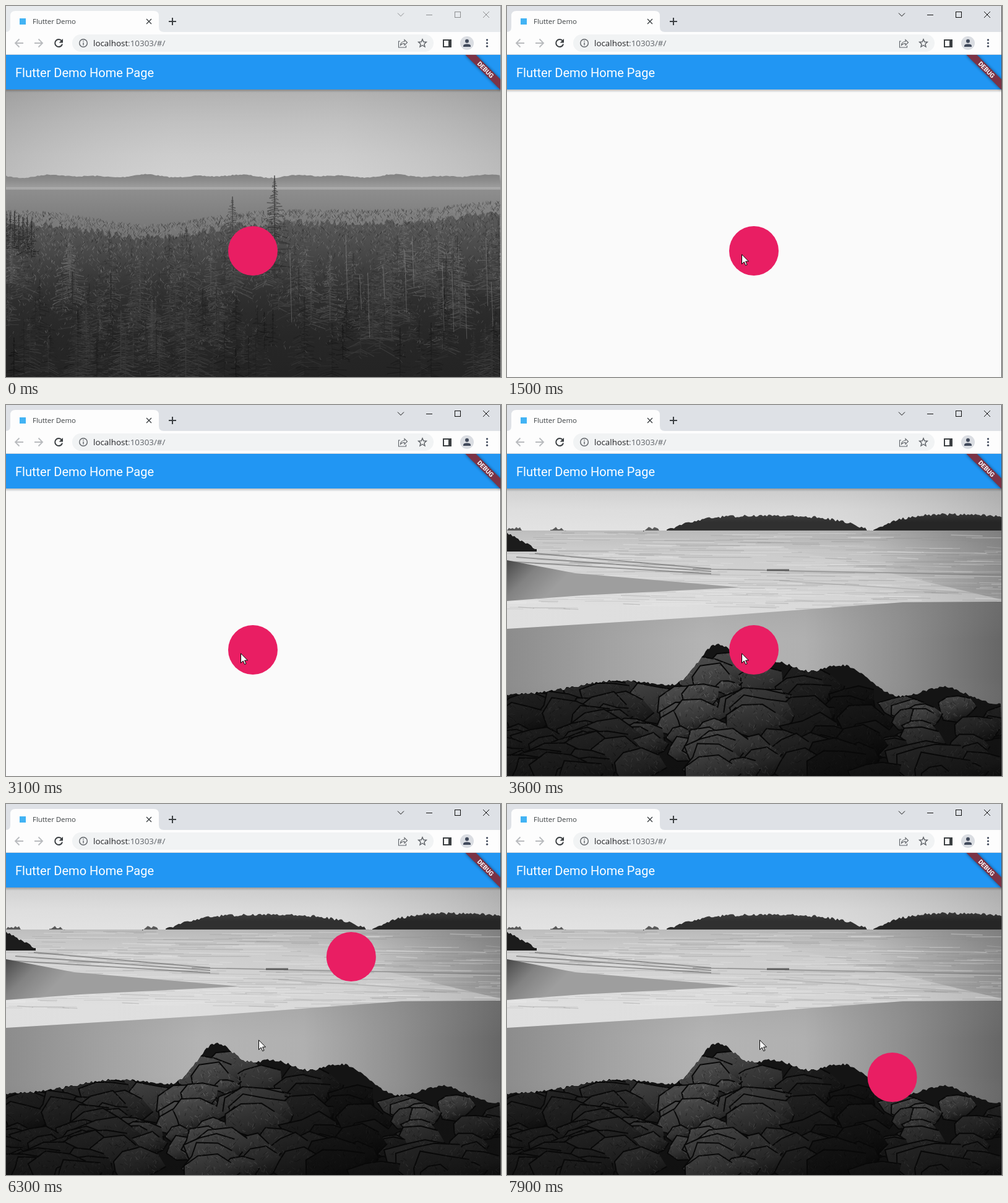
An HTML page with a canvas for the animation above (8000 ms loop, 800 px wide and 600 px high).

```html
<!DOCTYPE html>
<html lang="en">
<head>
<meta charset="utf-8">
<title>Flutter Demo</title>
<style>
  html, body { margin: 0; width: 100%; height: 100%; overflow: hidden; background: #fafafa; }
  canvas, svg { position: absolute; left: 0; top: 0; width: 800px; height: 600px; }
  .ui { font-family: "Open Sans", "Noto Sans", sans-serif; }
  .app { font-family: Roboto, sans-serif; fill: #fff; }
  .line { fill: none; stroke: #5f6368; stroke-width: 1.4; }
  .dark { stroke: #3c4043; }
  .bold { stroke-width: 2; }
</style>
</head>
<body>
<canvas id="forest" width="800" height="600"></canvas>
<canvas id="mist" width="800" height="600"></canvas>
<canvas id="coast" width="800" height="600"></canvas>
<svg viewBox="0 0 800 600">
  <defs>
    <filter id="soft" x="-50%" y="-100%" width="200%" height="300%"><feGaussianBlur stdDeviation="2.6"/></filter>
    <linearGradient id="drop" x1="0" y1="0" x2="0" y2="1">
      <stop offset="0" stop-opacity=".24"/><stop offset="1" stop-opacity="0"/>
    </linearGradient>
    <clipPath id="page"><path d="M0 79H799V600H0Z"/></clipPath>
  </defs>

  <circle id="ball" r="40" fill="#e91e63"/>

  <!-- app bar -->
  <path fill="url(#drop)" d="M0 135H799V140H0Z"/>
  <path fill="#2196f3" d="M0 79H799V135H0Z"/>
  <text class="app" x="15" y="115" font-size="20">Flutter Demo Home Page</text>
  <g clip-path="url(#page)">
    <g transform="translate(799 79) rotate(45)">
      <path d="M-40 28H40V40H-40Z" opacity=".5" filter="url(#soft)"/>
      <path d="M-40 28H40V40H-40Z" fill="#7b3346"/>
      <text class="app" y="37.6" font-size="10.2" font-weight="700" text-anchor="middle">DEBUG</text>
    </g>
  </g>

  <!-- tab strip -->
  <path id="strip" d="M0 0H800V42H0Z"/>
  <path fill="#fdfdfd" d="M0 42Q7 42 7 34V16Q7 8 15 8H239Q247 8 247 16V34Q247 42 255 42H800V78H0Z"/>
  <path fill="#d5d7da" d="M0 78H800V79H0Z"/>
  <rect x="22" y="20" width="10" height="10" fill="#42b3f4"/>
  <text class="ui" x="43" y="29" font-size="11.4" fill="#3c4043">Flutter Demo</text>
  <path class="line dark" d="M227 21L235 29M235 21L227 29"/>
  <path class="line dark bold" d="M263 25H275M269 19V31"/>
  <g id="controls" fill="none">
    <path d="M633 11.5L638 16.5L643 11.5M771 9L781 19M781 9L771 19"/>
    <path shape-rendering="crispEdges" d="M679 14.5H689M725.5 9.5H734.5V18.5H725.5Z"/>
  </g>

  <!-- toolbar -->
  <g fill="none" stroke="#b9bbbe" stroke-width="1.8">
    <path d="M28 60H15M21.5 53.5L15 60L21.5 66.5"/>
    <path d="M46 60H59M52.5 53.5L59 60L52.5 66.5"/>
  </g>
  <path class="line dark bold" d="M90 56.5A6 6 0 1 0 91 61.5"/>
  <path fill="#3c4043" d="M92 53V59.5H85.5Z"/>
  <rect x="107" y="46" width="584" height="28" rx="14" fill="#f1f3f4"/>
  <circle class="line" cx="125" cy="60" r="6.3"/>
  <path class="line" d="M125 59V63.5M125 56V57.6"/>
  <text class="ui" x="141" y="65" font-size="13.4" fill="#202124">localhost<tspan fill="#5f6368">:10303/#/</tspan></text>
  <path class="line" style="stroke-width:1.1" d="M637 57H634.5V67H646.5V64M637.5 63.5Q638 57.5 644 57.5V54.5L648.5 59L644 63.5V60.5Q640 60.5 637.5 63.5Z"/>
  <path class="line" d="M673 53.8L674.8 58L679.4 58.4L675.9 61.4L677 66L673 63.5L669 66L670.1 61.4L666.6 58.4L671.2 58Z"/>
  <path fill="#3c4043" d="M706 54H720V67H706ZM708 56V65H715V56Z" fill-rule="evenodd"/>
  <circle cx="745" cy="60" r="11" fill="#dadde2"/>
  <g fill="#414a5b">
    <circle cx="745" cy="56.8" r="3"/><path d="M739 66V64.5Q739 61.5 745 61.5T751 64.5V66Z"/>
    <circle cx="777.5" cy="54.8" r="1.6"/><circle cx="777.5" cy="60" r="1.6"/><circle cx="777.5" cy="65.2" r="1.6"/>
  </g>
  <path id="edge" d="M799 0H800V600H799Z"/>

  <path id="cursor" fill="#fff" stroke="#000" d="M.5 .8V16.3L4.2 12.8L6.7 18.5L9 17.5L6.6 12H11.5Z"/>
</svg>

<script>
const $ = id => document.getElementById(id);
const gray = (l, a = 1) => `rgba(${l},${l},${l},${a})`;
const bell = (x, mid, width) => Math.exp(-(((x - mid) / width) ** 2));
let seed = 7;
const rnd = (a = 0, b = 1) => {
  seed = (seed * 16807) % 2147483647;
  return a + (b - a) * seed / 2147483647;
};
const times = (n, f) => { for (let i = 0; i < n; i++) f(i / n); };

// ---- pictures ----
function painter(id) {
  const c = $(id).getContext('2d');
  c.beginPath(); c.rect(0, 135, 799, 465); c.clip();
  const fade = (x0, y0, x1, y1, tones) => {
    const g = c.createLinearGradient(x0, y0, x1, y1);
    tones.forEach((l, i) => g.addColorStop(i / (tones.length - 1), gray(...[l].flat())));
    return g;
  };
  const trace = pts => { c.beginPath(); pts.forEach(p => c.lineTo(...p)); };
  const poly = (pts, fill) => { trace(pts); c.fillStyle = fill; c.fill(); };
  const line = (x0, y0, x1, y1, l, w = 1, a = 1) => {
    trace([[x0, y0], [x1, y1]]);
    c.strokeStyle = gray(l, a); c.lineWidth = w; c.stroke();
  };
  const box = (y0, y1, fill) => poly([[0, y0], [800, y0], [800, y1], [0, y1]], fill);
  const band = (y0, y1, ...tones) => box(y0, y1, fade(0, y0, 0, y1, tones));
  return { c, fade, trace, poly, line, box, band };
}

// Area below y = top(x), with a bumpy upper edge
function below(top, base, bump, x0 = 0, x1 = 800) {
  const pts = [[x0, base]];
  for (let x = x0; x <= x1; x += 3) pts.push([x, top(x) + rnd(-bump, bump)]);
  return [...pts, [x1, base]];
}

function paintForest() {
  const { fade, poly, line, box, band } = painter('forest');
  band(135, 295, 172, 190, 203, 210);
  box(135, 295, fade(0, 0, 800, 0, [[110, .2], [220, .1], [220, .12], [110, .2]]));
  poly(below(x => 275 + 3 * Math.sin(x / 16) * Math.sin(x / 61 + 1), 294, .8), fade(0, 270, 0, 294, [128, 140, 158]));
  band(293, 297, 172, 165);
  band(297, 400, 142, 124, 108);

  const top = x => 350 + 24 * bell(x, 230, 120) - 14 * bell(x, 800, 90);
  const conifer = (x, y, h, l, spread = .25) => {
    line(x, y, x, y + h, l, 1.2);
    for (let d = 3; d < h; d += 3) for (const side of [-1, 1]) {
      const w = Math.min(26, d * spread) * rnd(.3, 1.4);
      line(x, y + d, x + side * w, y + d + w * rnd(-.1, .6), l + rnd(-12, 24), 1.3, .75);
    }
  };
  poly(below(top, 600, 6), fade(0, 340, 0, 600, [90, 70, 50, 42, 38]));
  times(7, p => conifer(p * 48, 329 + p * 18 + rnd(-3, 4), 60, 44));
  times(170, p => {
    const x = rnd(0, 800);
    conifer(x, top(x) - 14 + p * 200 + rnd(0, 14), rnd(50, 120), 86 - p * 42 + rnd(-28, 14));
  });
  conifer(366, 308, 150, 66);
  conifer(434, 274, 170, 52, .2);
  // twigs, thinning out downwards, and bare trunks
  times(7000, () => {
    const x = rnd(0, 800), d = 250 * rnd() * rnd();
    line(x, top(x) + d - 22, x + rnd(-4, 4), top(x) + d - 18, rnd(24, 155), 1, .5);
  });
  times(12, () => {
    const x = rnd(440, 790), y = rnd(360, 450);
    line(x, y, x + 3, y + rnd(50, 120), 140, 1, .6);
  });
  band(400, 600, [30, 0], [30, .22], [30, .3]);
}

function paintMist() {
  painter('mist').band(135, 600, 205, 185, 140, 90, 60);
}

function paintCoast() {
  const { c, fade, trace, poly, line, box, band } = painter('coast');
  band(135, 203, 205, 220, 226);
  band(203, 365, 182, 206, 212, 222, 222);
  box(135, 365, fade(0, 0, 800, 0, [[235, .15], [225, .1], [170, .1], [100, .32]]));
  poly([[330, 203], [800, 203], [800, 315]], fade(400, 320, 800, 210, [[90, 0], [90, .05], [90, .45]]));
  times(420, () => {
    const x = rnd(-80, 800), y = rnd(206, 330);
    line(x, y, x + rnd(20, 130), y + rnd(-.5, 2), rnd() < .5 ? 135 : 240, rnd(.6, 1.6), .3);
  });

  const island = (x0, x1, h, l) => poly(
    below(x => 203 - h * (1 - Math.abs(2 * (x - x0) / (x1 - x0) - 1) ** 3), 203, 2.2, x0, x1),
    fade(0, 175, 0, 204, [l + 18, l, l]));
  island(258, 586, 24, 48);
  island(592, 860, 26, 38);
  for (const x of [0, 70, 220]) island(x, x + 26, 4, 90);
  poly(below(x => 207 + x * .55, 237, 2, 0, 48), gray(28));

  // wave fronts and wet sand
  times(3, p => line(45 - p * 90, 240 + p * 18, 330, 265 + p * 12, 105, 2, .6));
  line(300, 265, 800, 275, 120, 1.6, .7);
  line(420, 267, 456, 267, 75, 3, .8);
  line(440, 284, 800, 307, 160, 1.4, .6);
  poly([[0, 251], [110, 272], [378, 295], [120, 308], [0, 317]], fade(0, 250, 60, 312, [70, 130, 158]));
  const sand = [[0, 362], [330, 342], [640, 319], [800, 318], [800, 600], [0, 600]];
  poly(sand, fade(0, 0, 800, 0, [140, 162, 180, 176, 142, 102]));
  poly(sand, fade(0, 320, 0, 500, [[130, .2], [150, 0], [150, 0], [100, .25]]));

  const ridge = x => 470 + x * .02 - 28 * bell(x, 190, 110) - 78 * bell(x, 338, 44)
    - 62 * bell(x, 430, 62) - 58 * bell(x, 545, 60) - 28 * bell(x, 705, 55);
  const light = (x, p) => 34 + 46 * bell(x, 320, 130) + 62 * bell(x, 690, 60) * (1 - p) - 16 * bell(x, 540, 70);
  const rock = (x, y, r, l) => {
    const pts = [];
    times(9, p => {
      const a = p * 2 * Math.PI, d = r * rnd(.7, 1.15);
      pts.push([x + d * 1.3 * Math.cos(a), y + d * .85 * Math.sin(a)]);
    });
    c.save();
    poly(pts, fade(x - r * .3, y - r, x + r * .4, y + r, [l, l * .75, l * .2]));
    c.strokeStyle = gray(8); c.lineWidth = 2; c.stroke();
    c.clip();
    times(r * 5, () => {
      const u = x + rnd(-r, r) * 1.3, v = y + rnd(-r, r);
      line(u, v, u + rnd(-6, 6), v + rnd(1, 6), rnd(0, l * 1.9), 1, .45);
    });
    c.restore();
  };
  const cliff = below(ridge, 600, 2);
  poly(cliff, gray(20));
  trace(cliff); c.clip();
  times(130, p => {
    const x = rnd(0, 800), y = ridge(x);
    rock(x, y + 14 + p * (590 - y), rnd(16, 46), light(x, p));
  });
  band(470, 600, [8, 0], [8, .3]);
}

// ---- motion ----
const clamp = p => Math.min(1, Math.max(0, p));
const ramp = (t, t0, t1) => clamp((t - t0) / (t1 - t0));

// Position along keys [time, x, y]
function at(keys, t) {
  const i = keys.findIndex(k => k[0] > t);
  if (i < 1) return keys.at(i).slice(1);
  const [t0, x0, y0] = keys[i - 1], [t1, x1, y1] = keys[i], p = ramp(t, t0, t1);
  return [x0 + (x1 - x0) * p, y0 + (y1 - y0) * p];
}

const dragKeys = [[4400, 399, 396], [4500, 413, 390], [4600, 413, 390], [4900, 506, 260]];
const cursorKeys = [[1000, 379, 401], [4000, 379, 401], [4300, 396, 408], [4400, 396, 408],
  [4500, 410, 402], [4600, 410, 402], [4900, 556, 224], [5500, 408, 381]];
const stalls = [5000, 5900, 7200]; // ticks on which the thrown ball stands still

function ballAt(t) {
  if (t < 4900) return at(dragKeys, t);
  const n = (t - 4900) / 100 - stalls.filter(s => s <= t).length;
  return [506 + 4.32 * n, 175 + Math.abs(84 - 13 * n)]; // bounces off the app bar
}

function cursorAt(t) {
  if (t >= 1000) return at(cursorKeys, t);
  const p = 1 - (1 - ramp(t, 100, 1000)) ** 2;
  return [32 + 347 * p, 401 * p];
}

function draw() {
  const t = Math.floor(performance.now() % 8000 / 100) * 100; // ten ticks a second
  const active = t >= 1300;
  $('forest').style.opacity = t < 1500 ? 1 : 0;
  $('mist').style.opacity = t < 3100 ? ramp(t, 2000, 2200) : 0;
  $('coast').style.opacity = ramp(t, 3200, 3600);
  $('ball').setAttribute('transform', `translate(${ballAt(t)})`);
  $('cursor').setAttribute('transform', `translate(${cursorAt(t)})`);
  $('cursor').style.display = t < 100 ? 'none' : '';
  $('strip').setAttribute('fill', active ? '#dee1e6' : '#e7eaed');
  $('controls').setAttribute('stroke', active ? '#111' : '#8c8e90');
  $('edge').setAttribute('fill', active ? '#555' : '#999');
  requestAnimationFrame(draw);
}

paintForest();
paintMist();
paintCoast();
draw();
</script>
</body>
</html>
```
